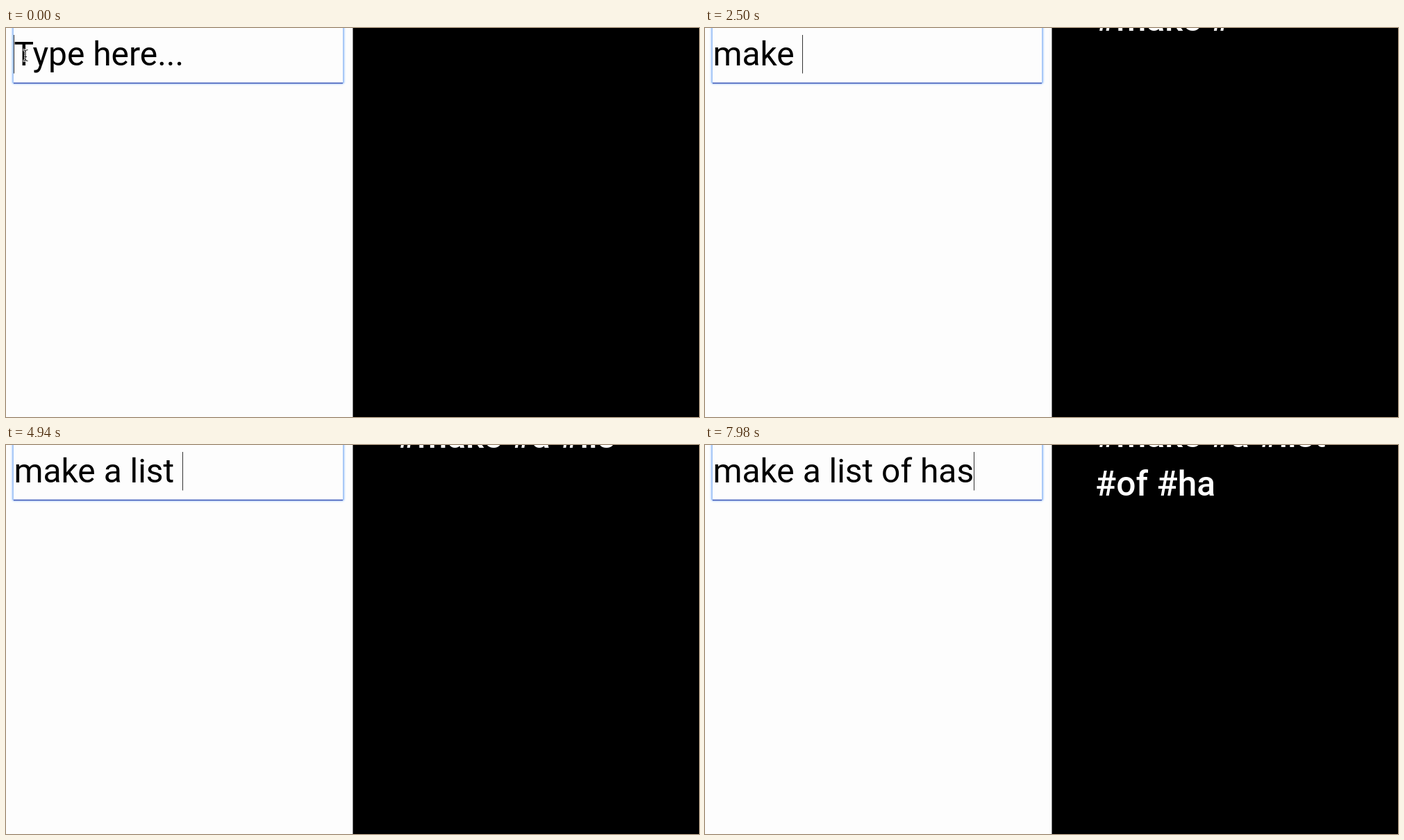
Write an HTML page with a canvas that moves like this. It is 998 by 561 pixels and loops after 8000 ms.

```html
<!DOCTYPE html>
<html lang="en">
<head>
<meta charset="utf-8">
<title>Typing hashtags</title>
<style>
  html, body { margin: 0; width: 100%; height: 100%; overflow: hidden; background: #000; }
  canvas { display: block; width: 998px; height: 561px; }
</style>
</head>
<body>
<canvas width="998" height="561"></canvas>
<script>
const LOOP = 8000;
const ECHO_DELAY = 160;
const PHRASE = 'make a list of has';
// Moment at which each character of the phrase is typed, in ms
const KEYS = [640, 1040, 1300, 1780, 2120, 2540, 2840, 3020, 3440,
              3760, 4800, 4900, 5460, 6200, 6760, 7300, 7640, 7900];
const INPUT_FONT = '47.9px Roboto, sans-serif';
const TAG_FONT = '500 49.6px Roboto, sans-serif';

const ctx = document.querySelector('canvas').getContext('2d');

function rect(color, x, y, w, h) {
  ctx.fillStyle = color;
  ctx.fillRect(x, y, w, h);
}

function text(str, x, y, font, color) {
  ctx.font = font;
  ctx.fillStyle = color;
  ctx.fillText(str, x, y);
}

const typedAt = t => KEYS.filter(k => k <= t).length;

function drawInput(t) {
  rect('#fdfdfd', 0, 0, 499.5, 561);

  ctx.save();
  ctx.strokeStyle = '#a9c9f7';
  ctx.lineWidth = 2;
  ctx.shadowColor = '#8fbcff';
  ctx.shadowBlur = 3;
  ctx.beginPath();
  ctx.roundRect(10, -20, 476, 99.5, 2);
  ctx.stroke();
  ctx.restore();
  rect('#fdfdfd', 11, 0, 474, 78.5);
  rect('#4257b2', 11, 78.8, 474, 1.4);

  const count = typedAt(t);
  const typed = PHRASE.slice(0, count);
  text(typed || 'Type here...', 11.5, 54, INPUT_FONT, '#000');

  const lastKey = count ? KEYS[count - 1] : 0;
  if ((t - lastKey) % 1000 < 500) {
    const x = Math.round(11 + ctx.measureText(typed).width);
    rect('#333', x, 10, 1, 55.5);
  }
}

function drawTags(t) {
  const count = typedAt(t - ECHO_DELAY);
  if (!count) return;
  const tags = PHRASE.slice(0, count).split(' ').map(word => '#' + word);
  // The fourth tag wraps as soon as it holds a letter
  const wraps = tags.length > 3 && tags[3].length > 1;
  const split = wraps ? 3 : tags.length;
  text(tags.slice(0, split).join(' '), 562, wraps ? 3 : 4, TAG_FONT, '#fff');
  text(tags.slice(split).join(' '), 562, 73, TAG_FONT, '#fff');
}

function drawPointer(t) {
  if (t >= KEYS[0]) return;
  const p = Math.min(1, Math.max(0, (t - 20) / 520));
  const ease = p * p * (3 - 2 * p);
  ctx.save();
  ctx.translate(28 - 16 * ease, 39.5 + 475 * ease);
  ctx.lineJoin = 'round';
  const outline = new Path2D(ease < 0.085
    ? 'M-3.5-8Q0-8 0-5Q0-8 3.5-8M0-5V5M-3.5 8Q0 8 0 5Q0 8 3.5 8M-2 2H2'
    : 'M0 0V16L3.6 12.6L6 18L8.6 17L6.2 11.6H11Z');
  ctx.strokeStyle = '#fff';
  ctx.lineWidth = 3;
  ctx.stroke(outline);
  if (ease < 0.085) {
    ctx.strokeStyle = '#222';
    ctx.lineWidth = 1.2;
    ctx.stroke(outline);
  } else {
    ctx.fillStyle = '#000';
    ctx.fill(outline);
  }
  ctx.restore();
}

function frame(now) {
  const t = now % LOOP;
  rect('#000', 0, 0, 998, 561);
  drawInput(t);
  drawTags(t);
  drawPointer(t);
  requestAnimationFrame(() => frame(performance.now() - start));
}

const start = performance.now();
frame(0);
</script>
</body>
</html>
```
